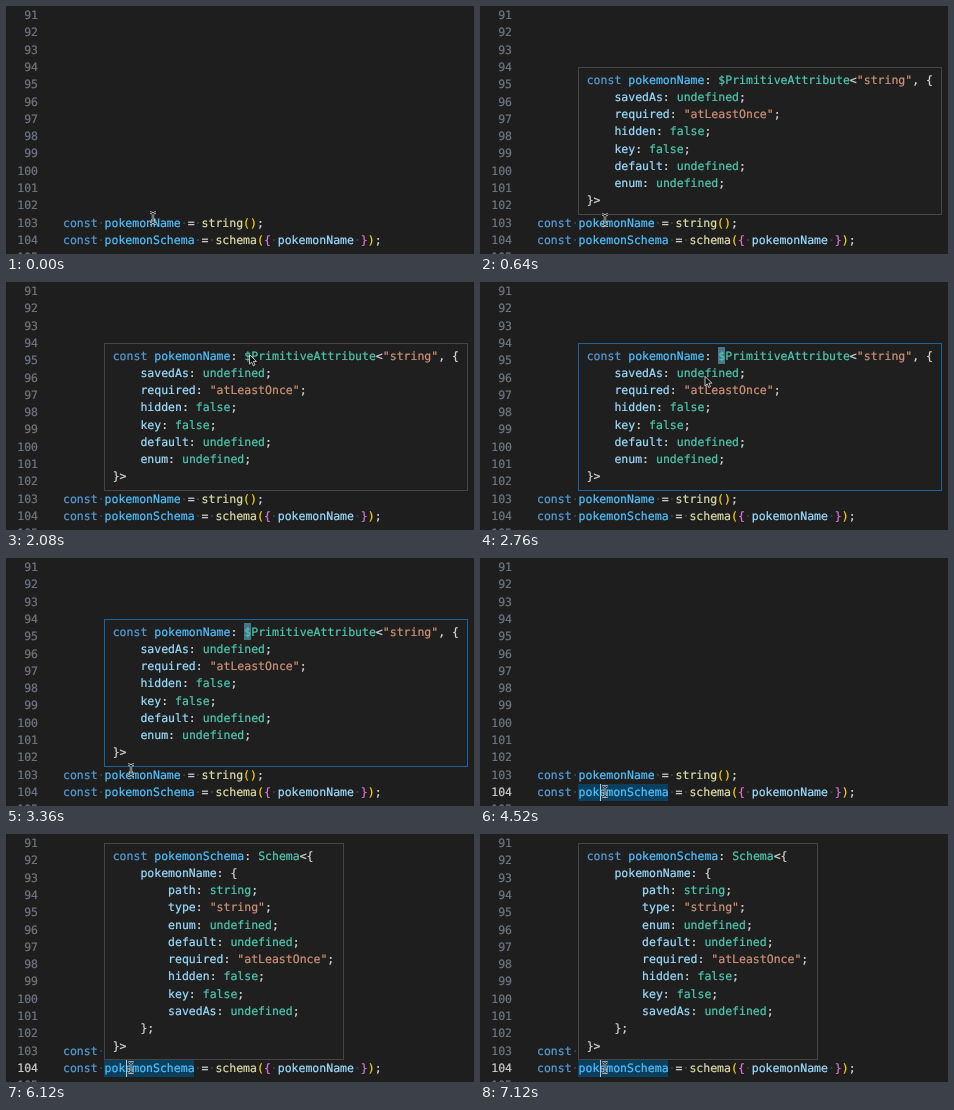
Animation of 468x248 px, one loop 7.44 s. Source, as an HTML page:

```html
<!DOCTYPE html>
<html lang="en">
<head>
<meta charset="utf-8">
<style>
html, body { margin: 0; width: 100%; height: 100%; overflow: hidden; background: #1e1e1e; }
#stage { position: relative; width: 468px; height: 248px; overflow: hidden; background: #1e1e1e; }
#stage > * { position: absolute; }
pre {
  margin: 0; color: #d4d4d4; text-rendering: geometricPrecision; -webkit-text-stroke: .22px;
  font: 11.5px/17.28px "DejaVu Sans Mono", "Liberation Mono", monospace;
}
#nums { top: 1.2px; right: 436px; color: #6e7681; text-align: right; }
#code { left: 57px; top: 208.5px; }
#word { left: 98px; top: 226px; width: 90px; height: 17px; background: #0b3f5e; }
#caret { left: 120px; top: 226px; width: 1px; height: 17px; background: #c4c8ca; }
.tip { left: 98px; padding: 3.5px 8.5px 4.3px 7.7px; border: 1px solid #454545; background: #1f1f1f; }
#tip1 { top: 61px; }
#tip2 { top: 9px; }
#tip1.focus { border-color: #1a639f; }
#tip1.focus .dollar { padding: 1.5px 0; background: #46758e; }
svg { left: 0; top: 0; overflow: visible; }
</style>
</head>
<body>
<div id="stage">
  <pre id="nums"></pre>
  <div id="word"></div>
  <pre id="code"></pre>
  <div id="caret"></div>
  <pre id="tip1" class="tip"></pre>
  <pre id="tip2" class="tip"></pre>
  <svg width="468" height="248" fill="none">
    <g id="beam">
      <path id="bar" d="M-3-5.5Q0-5.5 0-3.5V3.5Q0 5.5-3 5.5M3-5.5Q0-5.5 0-3.5M3 5.5Q0 5.5 0 3.5M-1.5 2H1.5" stroke="#c8c8c8" stroke-width="2.2"/>
      <use href="#bar" class="core"/>
      <path d="M-3-5.5Q0-5.5 0-3.5V3.5Q0 5.5-3 5.5M3-5.5Q0-5.5 0-3.5M3 5.5Q0 5.5 0 3.5" stroke="#222" stroke-width="1"/>
    </g>
    <path id="arrow" d="M0 0V9.6L2.2 7.6 3.8 11.2 5.5 10.4 3.9 6.9H6.9Z" fill="#111" stroke="#e4e4e4" stroke-width=".8"/>
  </svg>
</div>
<script>
const LOOP = 7440, STEP = 40;
const $ = id => document.getElementById(id);

// One colour per capture group below
const colors = ['#ce9178', '#569cd6', '#4fc1ff', '#dcdcaa', '#4ec9b0', '#9cdcfe', '#ffd700', '#da70d6', '#454545'];
const token = /(".*?")|(\bconst\b)|((?<=const.)\w+)|(\w+(?=\())|((?<=: )[\w$]+)|(\w+)|([()])|([{}])|( )|</g;

function paint(text, isCode) {
  return text.replace(token, (m, ...groups) => {
    const i = groups.slice(0, colors.length).findIndex(g => g !== undefined);
    if (i < 0) return '&lt;';
    if (i > 6 && !isCode) return m;
    const body = i === 8 ? '·' : m.replace('$', '<span class="dollar">$$</span>');
    return `<span style="color:${colors[i]}">${body}</span>`;
  });
}

$('nums').innerHTML = Array.from({ length: 15 }, (_, i) => `<span>${91 + i}</span>`).join('\n');
$('code').innerHTML = paint(`const pokemonName = string();
const pokemonSchema = schema({ pokemonName });`, true);
$('tip1').innerHTML = paint(`const pokemonName: $PrimitiveAttribute<"string", {
    savedAs: undefined;
    required: "atLeastOnce";
    hidden: false;
    key: false;
    default: undefined;
    enum: undefined;
}>`);
$('tip2').innerHTML = paint(`const pokemonSchema: Schema<{
    pokemonName: {
        path: string;
        type: "string";
        enum: undefined;
        default: undefined;
        required: "atLeastOnce";
        hidden: false;
        key: false;
        savedAs: undefined;
    };
}>`);
const activeNum = $('nums').children[13];

// Pointer path: time, x, y
const path = [
  [0, 147, 212], [280, 125, 214], [680, 125, 214], [1280, 177.5, 175],
  [2000, 243.5, 72.5], [2560, 243.5, 72.5], [3360, 125, 212],
  [3600, 125, 212], [3760, 125, 233.5], [LOOP, 125, 233.5]
];
const clamp = v => Math.min(1, Math.max(0, v));
const ease = p => p * p * (3 - 2 * p);

function pointer(t) {
  const i = path.findIndex(k => k[0] > t);
  const [t0, x0, y0] = path[i - 1], [t1, x1, y1] = path[i];
  const p = ease((t - t0) / (t1 - t0));
  return [x0 + (x1 - x0) * p, y0 + (y1 - y0) * p];
}

const show = (el, on) => { el.style.visibility = on ? 'visible' : 'hidden'; };

function draw(now) {
  const t = Math.floor(now % LOOP / STEP) * STEP;
  const [x, y] = pointer(t);
  const inTip = t >= 680 && t < 3600 && y < 207;
  for (const id of ['beam', 'arrow']) $(id).setAttribute('transform', `translate(${x} ${y})`);
  show($('beam'), !inTip);
  show($('arrow'), inTip);

  $('tip1').style.opacity = t < 4120 ? clamp((t - 520) / 120) : 0;
  $('tip1').classList.toggle('focus', t >= 2320);
  $('tip2').style.opacity = clamp((t - 4600) / 120);

  activeNum.style.color = t >= 4120 ? '#ccc' : '';
  show($('word'), t >= 4320);
  show($('caret'), t >= 4120 && (t - 4120) % 1000 < 480);
}

const start = performance.now();
function tick() {
  draw(performance.now() - start);
  requestAnimationFrame(tick);
}
tick();
</script>
</body>
</html>
```
